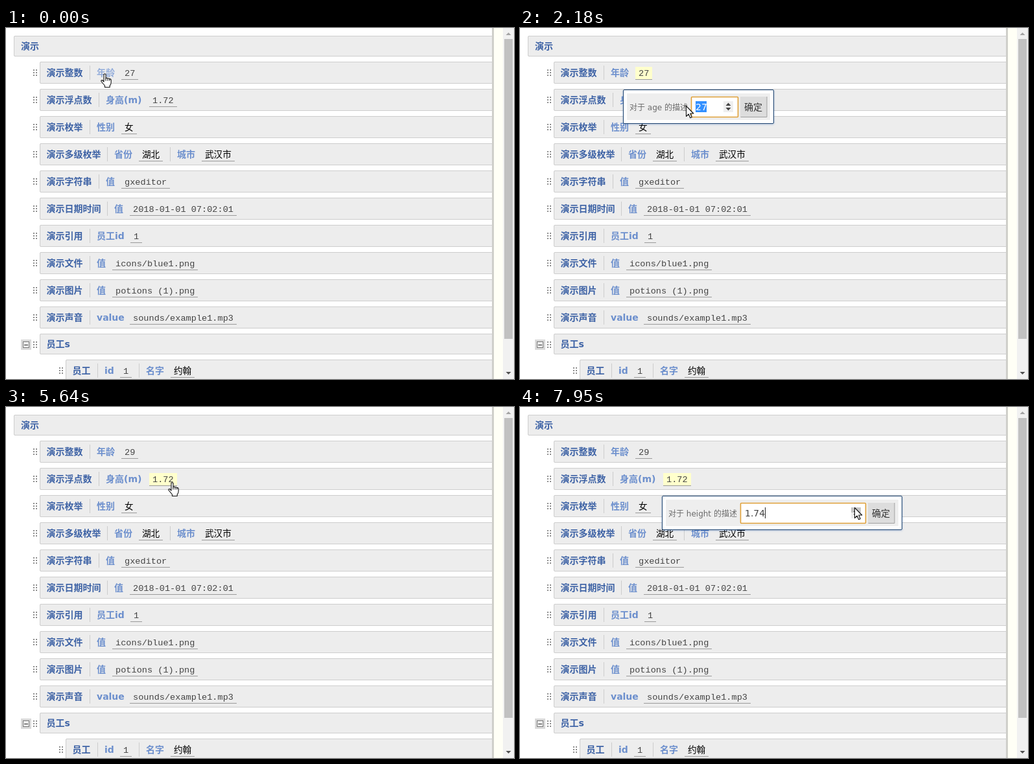
An HTML page for the animation above (8 s loop, 784 by 542 pixels).

```html
<!DOCTYPE html>
<html lang="zh-CN">
<head>
<meta charset="utf-8">
<title>演示</title>
<style>
html, body { margin: 0; width: 100%; height: 100%; overflow: hidden; background: #fff; }
svg { display: block; }
text { white-space: pre; font: 14px 'DejaVu Sans', 'Noto Sans CJK SC', 'Noto Sans CJK', sans-serif; }
.name { font-weight: bold; fill: #3d62a5; }
.field { font-weight: bold; fill: #6c8fcd; }
.field.hot { fill: #95aedb; }
.value { font: 13.6px 'Liberation Mono', 'Noto Sans CJK SC', 'Noto Sans CJK', monospace; fill: #444; }
.value.han { fill: #000; }
.hint { font-size: 12px; fill: #6a6a6a; }
.entry { fill: #444; }
.bar { fill: #ededed; stroke: #cdcdcd; filter: drop-shadow(0 0 .6px rgba(0,0,0,.2)); }
.pop { filter: drop-shadow(0 1px 1.5px rgba(20,80,170,.3)); }
</style>
</head>
<body>
<svg id="stage" width="784" height="542" viewBox="0 0 784 542">
  <clipPath id="page"><rect width="750" height="542"/></clipPath>
</svg>
<script>
const stage = document.getElementById('stage');

function add(parent, tag, attrs, content) {
  const el = document.createElementNS('http://www.w3.org/2000/svg', tag);
  for (const key in attrs) el.setAttribute(key, attrs[key]);
  if (content !== undefined) el.textContent = content;
  parent.append(el);
  return el;
}
const rect = (p, x, y, width, height, fill, more) => add(p, 'rect', { x, y, width, height, fill, ...more });
const text = (p, x, y, cls, content) => add(p, 'text', { x, y, class: cls }, content);
const path = (p, d, fill, more) => add(p, 'path', { d, fill, ...more });
const show = (el, on) => el.setAttribute('visibility', on ? 'inherit' : 'hidden');
const isHan = c => c > '\u2e80';

// ---- page ----
const page = add(stage, 'g', { 'clip-path': 'url(#page)' });
const cells = {};

function bar(x, y, h) {
  add(page, 'rect', { class: 'bar', x: x + .5, y: y + .5, width: 800 - x, height: h - 1, rx: 1.5 });
}
function grip(x, y) {
  for (let i = 0; i < 6; i++) rect(page, x + i % 2 * 4, y + (i >> 1) * 4, 2, 2, '#8c8c8c');
}
// Each field: separator x, caption, value box x, value
function row(x, y, name, ...fields) {
  bar(x, y, 34);
  grip(x - 10, y + 12);
  text(page, x + 10.5, y + 22, 'name', name);
  for (const [sep, caption, boxX, value] of fields) {
    const w = Math.round([...value].reduce((sum, c) => sum + (isHan(c) ? 13.6 : 8.16), 10));
    rect(page, sep, y + 6, 1, 22, '#ccc');
    const field = text(page, sep + 11, y + 22, 'field', caption);
    const back = rect(page, boxX, y + 8, w, 20, 'none');
    rect(page, boxX, y + 27, w, 1, '#9a9a9a');
    const cls = isHan(value) ? 'value han' : 'value';
    cells[caption] = { field, back, value: text(page, boxX + 5, y + 21.5, cls, value) };
  }
}

bar(12, 12, 32);
text(page, 23, 33, 'name', '演示');
[
  ['演示整数', [129, '年龄', 178, '27']],
  ['演示浮点数', [143, '身高(m)', 221, '1.72']],
  ['演示枚举', [129, '性别', 178, '女']],
  ['演示多级枚举', [156, '省份', 205, '湖北'], [253, '城市', 302, '武汉市']],
  ['演示字符串', [143, '值', 178, 'gxeditor']],
  ['演示日期时间', [156, '值', 191, '2018-01-01 07:02:01']],
  ['演示引用', [129, '员工id', 192, '1']],
  ['演示文件', [129, '值', 164, 'icons/blue1.png']],
  ['演示图片', [129, '值', 164, 'potions (1).png']],
  ['演示声音', [129, 'value', 191, 'sounds/example1.mp3']]
].forEach((r, i) => row(52, 52 + 42 * i, ...r));
bar(52, 472, 32);
grip(42, 484);
text(page, 62.5, 493, 'name', '员工s');
rect(page, 23, 481, 16, 16, '#d9d9d9');
rect(page, 26.5, 484.5, 9, 9, '#f6f6f6', { stroke: '#777' });
rect(page, 28, 489, 6, 1, '#222');
row(92, 512, '员工', [141, 'id', 176, '1'], [205, '名字', 254, '约翰']);

// ---- right edge and scrollbar ----
rect(stage, 750, 0, 3, 542, '#cfcfca');
rect(stage, 753, 0, 14, 542, '#fffff6');
rect(stage, 767, 0, 17, 542, '#f1f1f1');
rect(stage, 769, 17, 13, 463, '#c1c1c1');
path(stage, 'M771.5 11h8l-4-4z', '#a3a3a3');
path(stage, 'M771.5 531h8l-4 4z', '#505050');

// ---- popups ----
function popup(id, x, y, w, label, inputX, inputW) {
  const clip = add(add(stage, 'clipPath', { id }), 'rect', { x: x - 5, y: y - 5, width: w + 10, height: 0 });
  const root = add(stage, 'g', { 'clip-path': `url(#${id})` });
  const frame = add(root, 'g', { class: 'pop' });
  const edge = rect(frame, x + .5, y + .5, w - 1, 52, '#fff', { rx: 1.5 });
  rect(root, x + 6, y + 6, w - 12, 41, '#eee');
  text(root, x + 10, y + 32, 'hint', label);
  const top = y + 11;
  rect(root, inputX, top, inputW + 1, 32, '#fff');
  const idle = path(root, `M${inputX + .5} ${top + 31}V${top + .5}H${inputX + inputW}`, 'none', { stroke: '#a5a5a5' });
  const ring = rect(root, inputX + .5, top + .5, inputW, 31, 'none', { rx: 1, stroke: '#dfa038', 'stroke-width': 1.6 });
  const sel = rect(root, 0, y + 18, 0, 17, '#3390ff');
  const entry = text(root, inputX + 7, y + 32, 'entry');
  const caret = rect(root, 0, y + 18, 1, 17, '#222');
  const spin = add(root, 'g', {});
  const sx = inputX + inputW - 22;
  rect(spin, sx, y + 18, 15, 17, '#efefef');
  const press = rect(spin, sx, y + 18, 15, 8, '#c6c6c6');
  path(spin, `M${sx + 3.5} ${y + 25}h8l-4-4.5zm0 3h8l-4 4.5z`, '#444');
  const bx = inputX + inputW + 4;
  rect(root, bx, top, 41, 32, '#ddd');
  path(root, `M${bx + .5} ${top + 31.5}h40.5v-31.5`, 'none', { stroke: '#a0a0a0' });
  add(root, 'text', { x: bx + 6, y: y + 32, fill: '#333' }, '确定');

  const end = s => Math.floor([...s].reduce((sum, c) => sum + (c === '.' ? 4.45 : 8.9), inputX + 7));
  return s => {
    show(root, s.open > 0);
    clip.setAttribute('height', s.open < 1 ? 53 * s.open + 5 : 64);
    edge.setAttribute('stroke', s.open < 1 ? '#26303c' : '#1d436f');
    show(ring, s.focus);
    show(idle, !s.focus);
    show(spin, s.focus);
    show(press, s.focus && s.press);
    const cut = s.entry.length - s.sel;
    const from = end(s.entry.slice(0, cut));
    sel.setAttribute('x', from);
    sel.setAttribute('width', end(s.entry) - from);
    show(sel, s.sel);
    entry.textContent = '';
    add(entry, 'tspan', {}, s.entry.slice(0, cut));
    add(entry, 'tspan', { fill: '#fff' }, s.entry.slice(cut));
    caret.setAttribute('x', end(s.entry.slice(0, s.caret)));
    show(caret, s.focus && !s.sel);
  };
}
const agePopup = popup('ageClip', 159, 95, 233, '对于 age 的描述', 264, 72);
const heightPopup = popup('heightClip', 219, 137, 371, '对于 height 的描述', 340, 193);

// ---- mouse pointers ----
const line = { stroke: '#111', 'stroke-width': 1.1, 'stroke-linejoin': 'round' };
const pointers = { hand: add(stage, 'g', {}), arrow: add(stage, 'g', {}), beam: add(stage, 'g', {}) };
path(pointers.hand, 'M5 1.5q1.5-1.5 3 0V7.5q1.6-.9 3 .6 1.6-.8 2.8.6 2-.4 2.4 1.4V14q0 3-2 5v2.5H6.5V19L1 12.5Q.5 10.3 2.6 10.5L5 13Z', '#fff', line);
path(pointers.hand, 'M8 7.5V11.5M11 8.5V11.5M13.8 9V11.5', 'none', line);
path(pointers.arrow, 'M.5.5V16.5L4.2 13 6.7 18.8 9.2 17.7 6.8 12H11.8Z', '#fff', line);
path(pointers.beam, 'M.5.5H3L4 1.5 5 .5H7.5M4 1.5V14.5M.5 15.5H3L4 14.5 5 15.5H7.5', 'none', { stroke: '#111', 'stroke-width': 1.2 });

// Pointer shape, then time, x, y for each step
const moves = [
  ['hand', [0, 146, 70], [80, 155, 67]],
  ['arrow', [160, 172, 60], [230, 182, 54], [310, 189, 49], [380, 190, 47], [680, 177, 52]],
  ['hand', [850, 179, 62], [920, 181, 65], [1070, 186, 70]],
  ['arrow', [1160, 212, 90], [1240, 233, 102], [1320, 250, 109]],
  ['beam', [1390, 270, 112], [1460, 284, 112], [1530, 293, 111], [1590, 295, 110], [1680, 296, 110],
    [1890, 291, 113], [1960, 281, 116], [2040, 271, 119]],
  ['arrow', [2110, 246, 119], [2180, 256, 120]],
  ['hand', [4310, 253, 120], [5120, 252, 120], [5340, 254, 120], [5490, 250, 116], [6180, 246, 118]],
  ['arrow', [6260, 259, 130], [6340, 285, 141], [6420, 320, 148]],
  ['beam', [6500, 365, 154], [6580, 410, 156], [6660, 456, 156], [6740, 500, 155], [6820, 532, 152],
    [6900, 526, 148], [6980, 521, 144], [7110, 521, 146]],
  ['arrow', [7330, 516, 153], [7410, 516, 155]]
].flatMap(([shape, ...steps]) => steps.map(([t, x, y]) => ({ t, shape, x, y })));

const WARM = '#f8f0e2', YELLOW = '#ffffcc';
const closed = { open: 0, focus: 0, sel: 0, caret: 0, press: 0 };
const start = { hot: 1, age: '27', ageBack: 'none', heightBack: 'none', a: { ...closed, entry: '27' }, h: { ...closed, entry: '1.72' } };
const changes = [
  [80, { hot: 0 }],
  [850, { ageBack: WARM }],
  [920, { ageBack: YELLOW }],
  [990, { a: { open: .2 } }],
  [1070, { a: { open: .6 } }],
  [1160, { a: { open: .96 } }],
  [1240, { a: { open: 1, focus: 1 } }],
  [1590, { a: { caret: 2 } }],
  [1960, { a: { sel: 1 } }],
  [2040, { a: { sel: 2 } }],
  [3710, { a: { sel: 0, entry: '2', caret: 1 } }],
  [3840, { a: { entry: '29', caret: 2 } }],
  [4230, { age: '29', ageBack: 'none', a: { open: .5, focus: 0 } }],
  [4310, { a: { open: 0 }, heightBack: WARM }],
  [5640, { heightBack: YELLOW }],
  [5730, { h: { open: .2 } }],
  [5830, { h: { open: .6 } }],
  [5940, { h: { open: .96 } }],
  [6020, { h: { open: 1, focus: 1 } }],
  [7410, { h: { press: 1, caret: 4 } }],
  [7500, { h: { press: 0 } }],
  [7660, { h: { press: 1, entry: '1.73' } }],
  [7800, { h: { entry: '1.74' } }]
];

function stateAt(t) {
  const s = { ...start };
  for (const [at, c] of changes) {
    if (at > t) break;
    Object.assign(s, c, { a: { ...s.a, ...c.a }, h: { ...s.h, ...c.h } });
  }
  return s;
}

function draw(t) {
  const s = stateAt(t);
  const { 年龄: age, '身高(m)': height } = cells;
  age.field.classList.toggle('hot', !!s.hot);
  age.value.textContent = s.age;
  age.back.setAttribute('fill', s.ageBack);
  height.back.setAttribute('fill', s.heightBack);
  agePopup(s.a);
  heightPopup(s.h);
  const m = moves.findLast(step => step.t <= t);
  for (const shape in pointers) show(pointers[shape], shape === m.shape);
  pointers[m.shape].setAttribute('transform', `translate(${m.x} ${m.y})`);
}

const began = performance.now();
function tick() {
  draw((performance.now() - began) % 8000);
  requestAnimationFrame(tick);
}
tick();
</script>
</body>
</html>
```
